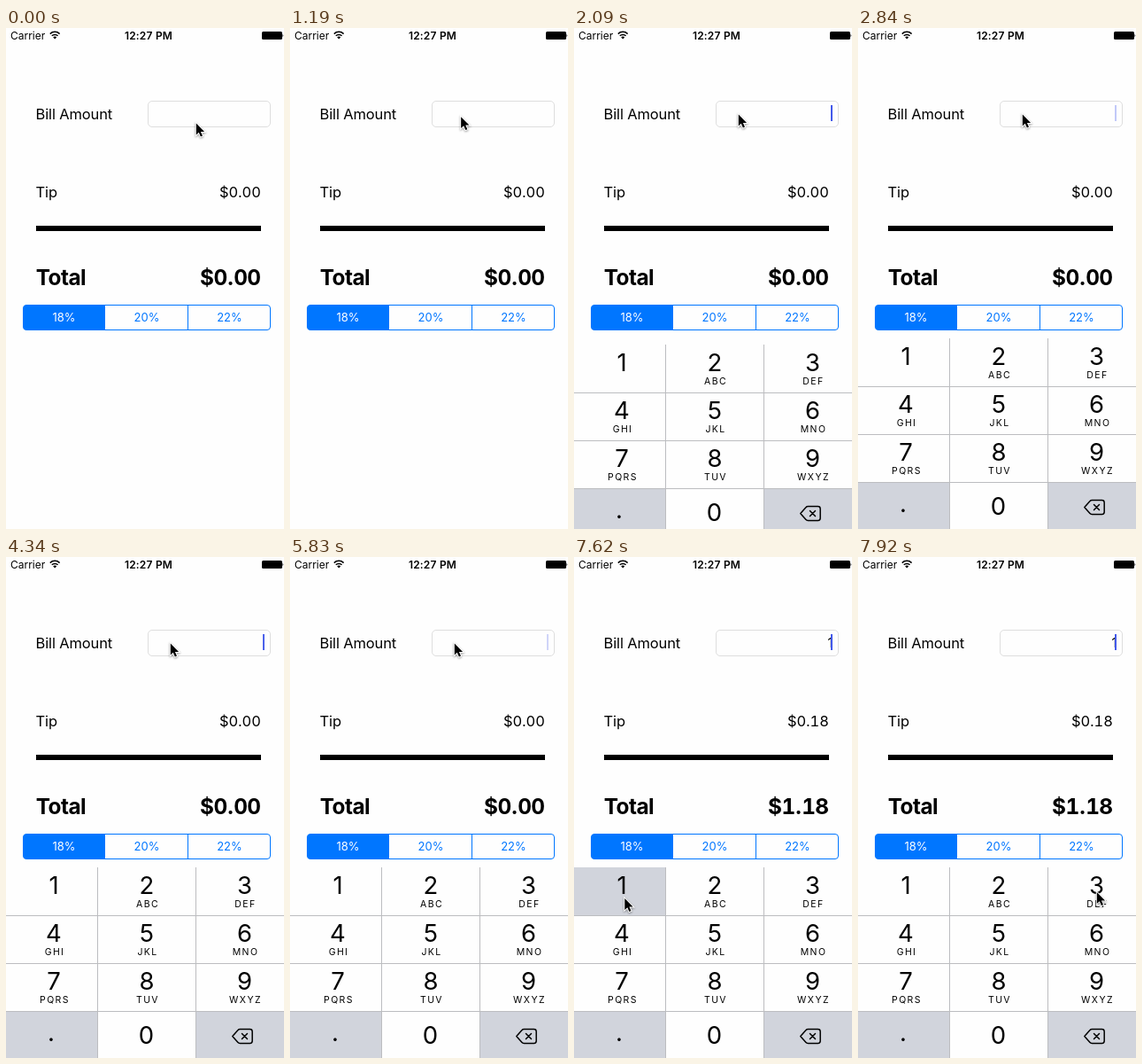
Animation, 314 px wide and 565 px high, one loop 8000 ms. Source, as an HTML page:

```html
<!DOCTYPE html>
<html lang="en">
<head>
<meta charset="utf-8">
<title>Tip calculator</title>
<style>
html, body { margin: 0; width: 100%; height: 100%; overflow: hidden; background: #fefefe; }
svg { display: block; width: 314px; height: 565px; font-family: Inter, Roboto, sans-serif; }
.label { font-size: 16.5px; letter-spacing: -.15px; }
.total { font-size: 24.4px; font-weight: 700; letter-spacing: -.6px; }
.num { font-variant-numeric: tabular-nums; }
.seg { font-size: 13px; fill: #0076ff; text-anchor: middle; }
.digit { font-size: 27.5px; text-anchor: middle; }
.letters { font-size: 10.5px; letter-spacing: 1.4px; text-anchor: middle; }
.end { text-anchor: end; }
.line { fill: none; stroke: #000; stroke-width: 1.5; }
#cursor { filter: drop-shadow(0 1px 1px #0006); }
</style>
</head>
<body>
<svg viewBox="0 0 314 565">
  <text x="5" y="12.5" font-size="12">Carrier</text>
  <path class="line" d="M49.8 6.6a7.6 7.6 0 0 1 10.8 0M51.8 8.8a4.8 4.8 0 0 1 6.8 0"/>
  <path d="M53.2 10.4a2.8 2.8 0 0 1 4 0l-2 2.2z"/>
  <text x="161" y="12.5" font-size="12" font-weight="600" letter-spacing=".2" text-anchor="middle">12:27 PM</text>
  <rect x="289" y="4" width="23" height="9" rx="1.5"/>
  <path d="M312.5 7q1.6 1.6 0 3.2z"/>

  <text class="label" x="33.6" y="103">Bill Amount</text>
  <rect x="160.5" y="82.5" width="138" height="29" rx="4.5" fill="#fefefe" stroke="#dedede"/>
  <text id="bill" class="end" x="292.3" y="102" font-size="14.5"></text>
  <rect id="caret" x="290" y="87" width="2" height="18" fill="#4259ea"/>

  <text class="label" x="33.6" y="191">Tip</text>
  <text id="tip" class="label end" x="287.7" y="191"></text>
  <path d="M34 223h254v6H34z"/>
  <text class="total" x="33.8" y="290">Total</text>
  <text id="total" class="total end" x="287.5" y="290"></text>

  <rect x="19.5" y="312.5" width="279" height="28" rx="3.5" fill="#fefefe" stroke="#0076ff"/>
  <path d="M112 312.5H23a3.5 3.5 0 0 0-3.5 3.5v21a3.5 3.5 0 0 0 3.5 3.5H112z" fill="#0076ff"/>
  <path d="M205.5 313v27" stroke="#0076ff"/>
  <text class="seg" x="65.5" y="331" style="fill:#fff">18%</text>
  <text class="seg" x="159" y="331">20%</text>
  <text class="seg" x="252.5" y="331">22%</text>

  <g id="pad">
    <path d="M0 350h314v216H0z" fill="#fefefe"/>
    <path d="M0 512.5h103.5V566H0zM214.5 512.5H314V566h-99.5z" fill="#d1d4dc"/>
    <path id="pressed" d="M0 350h103.5v54.5H0z" fill="#d1d4dc"/>
    <path d="M0 404.5h314M0 458.5h314M0 512.5h314M103.5 350v216M214.5 350v216" stroke="#bcbdc0"/>
    <g id="keys"></g>
    <g class="line" stroke-linejoin="round" stroke-linecap="round">
      <path d="M255.8 540.5l6-6.8q1-1.2 2.6-1.2H275.5q2.700 0 2.700 2.700v10.600q0 2.700-2.700 2.700H264.400q-1.600 0-2.600-1.200z"/>
      <path d="M266.5 537.5l6 6m0-6l-6 6"/>
    </g>
  </g>
  <g id="cursor">
    <path d="M.3 .6v12.800l3-2.700 2.100 4.800 2.100-.9-2.100-4.700h4.200z" stroke="#fff" stroke-width="2" paint-order="stroke"/>
  </g>
</svg>
<script>
const $ = id => document.getElementById(id);
const LOOP = 8000, STEP = 149.4;
const FOCUS = 1835.5, PRESS = 7465, TYPED = 7615, RELEASE = 7765;

const columns = [54, 159, 269.5];
const letters = ['', 'ABC', 'DEF', 'GHI', 'JKL', 'MNO', 'PQRS', 'TUV', 'WXYZ'];
const text = (kind, x, y, s) => `<text class="${kind}" x="${x}" y="${y}">${s}</text>`;
$('keys').innerHTML = letters.map((s, i) => {
  const x = columns[i % 3], y = 350 + 54 * Math.floor(i / 3);
  return text('digit', x, y + 30, i + 1) + text('letters', x + 1, y + 45, s);
}).join('') + text('digit', 51, 545.5, '.') + text('digit', 158.5, 549, 0);

const clamp = v => Math.min(1, Math.max(0, v));
const smooth = v => v * v * (3 - 2 * v);
const money = v => '$' + v.toFixed(2).replace(/\d+/g, '<tspan class="num">$&</tspan>');

// Pointer moves: start, end, destination.
const moves = [
  [900, 1340, 185.5, 97],
  [6880, 7020, 203, 271.5],
  [7020, 7460, 57, 384.5],
  [7775, 7915, 269.5, 377.5]
];

function pointer(t) {
  let x = 214.5, y = 107;
  for (const [from, to, toX, toY] of moves) {
    const k = smooth(clamp((t - from) / (to - from)));
    x += (toX - x) * k;
    y += (toY - y) * k;
  }
  return [x, y];
}

// Critically damped spring, sliding the pad up by its own height.
function padOffset(t) {
  const k = Math.max(0, t - FOCUS) * .02055;
  return Math.round(216 * (1 + k) * Math.exp(-k));
}

// Blinks once a second with short fades; stays lit while typing.
function caret(t) {
  if (t < FOCUS) return 0;
  if (t >= PRESS) return 1;
  const p = t % 1000;
  return clamp(Math.max((475 - p) / 150, (p - 790) / 150));
}

function draw(now) {
  // The screen refreshes in coarse steps.
  const t = Math.floor((now % LOOP + 6) / STEP) * STEP;
  const bill = t >= TYPED ? 1 : 0;
  $('cursor').setAttribute('transform', `translate(${pointer(t)})`);
  $('pad').setAttribute('transform', `translate(0 ${padOffset(t)})`);
  $('caret').setAttribute('opacity', caret(t));
  $('pressed').setAttribute('opacity', t >= PRESS && t < RELEASE ? 1 : 0);
  $('bill').textContent = bill || '';
  $('tip').innerHTML = money(bill * .18);
  $('total').innerHTML = money(bill * 1.18);
}

const start = performance.now();
function tick() {
  draw(performance.now() - start);
  requestAnimationFrame(tick);
}
tick();
</script>
</body>
</html>
```
